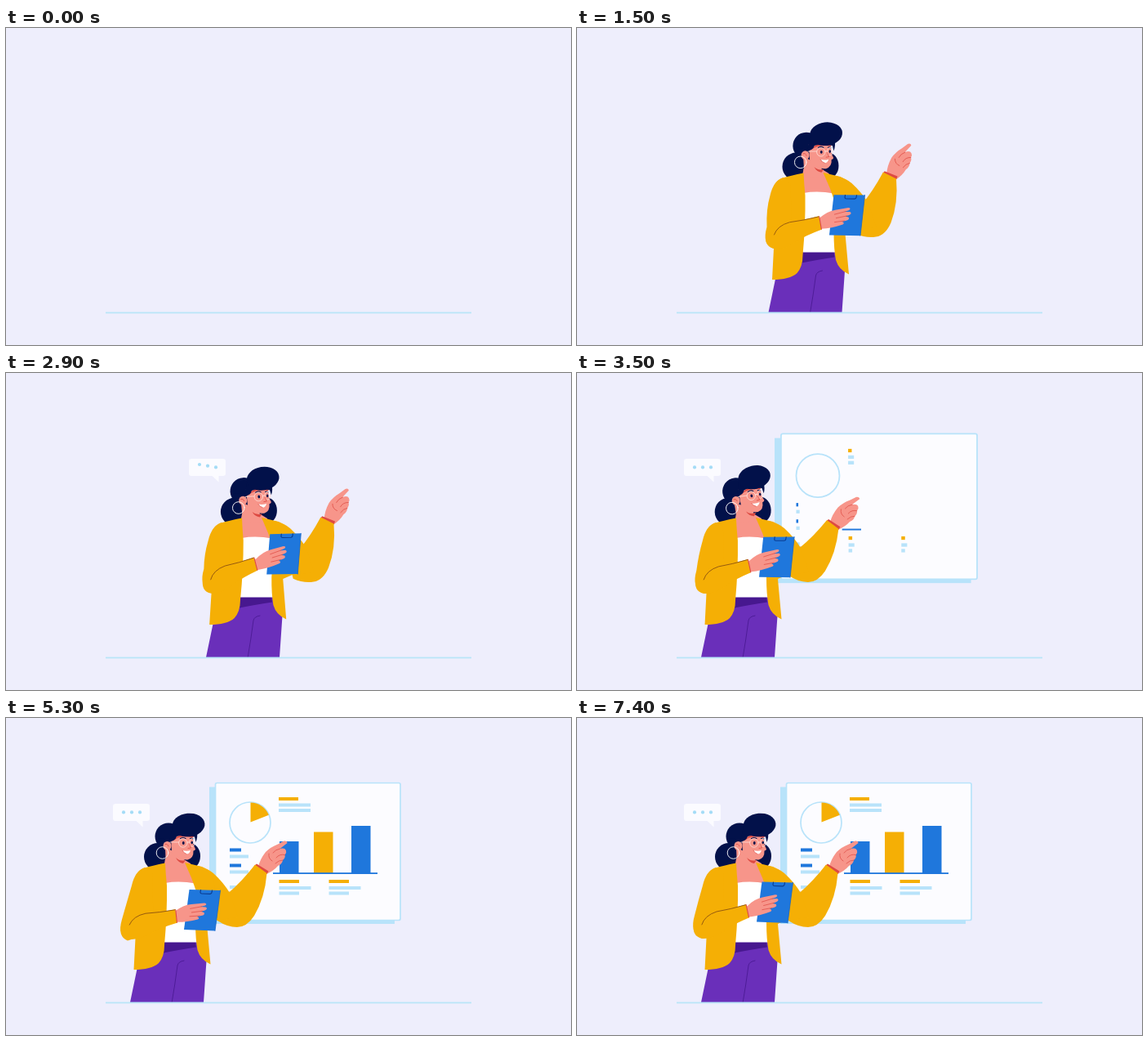
Recreate the animation shown at these times as an HTML page with a canvas. Size 692 px wide and 388 px high, loop 7.5 s.

```html
<!DOCTYPE html>
<html lang="en">
<head>
<meta charset="utf-8">
<title>Presentation</title>
<style>
  html, body { margin: 0; width: 100%; height: 100%; overflow: hidden; background: #eeeefc; }
  canvas { display: block; width: 692px; height: 388px; }
</style>
</head>
<body>
<canvas id="stage" width="692" height="388"></canvas>
<script>
const ctx = document.getElementById('stage').getContext('2d');
const LOOP = 7500, STEP = 100;
const C = {
  bg: '#eeeefc', pale: '#b8e3fa', paper: '#fcfcff', blue: '#1f77dc', deep: '#0b3d91',
  gold: '#f5af05', seam: '#8f5410', skin: '#f7958a', blush: '#dd4a42',
  navy: '#02114a', purple: '#6a2fba', plum: '#47188f', white: '#ffffff', lens: '#ffe0da'
};

// Eased value from [time, value] pairs
function key(t, list) {
  if (t <= list[0][0]) return list[0][1];
  for (let i = 1; i < list.length; i++) {
    const [a, x] = list[i - 1], [b, y] = list[i];
    if (t < b) {
      const u = (t - a) / (b - a);
      return x + (y - x) * u * u * (3 - 2 * u);
    }
  }
  return list[list.length - 1][1];
}
const easeOut = u => 1 - Math.pow(1 - Math.min(1, Math.max(0, u)), 3);

function fill(d, color) {
  ctx.fillStyle = color;
  ctx.fill(new Path2D(d));
}
function line(d, color, width = 1) {
  ctx.strokeStyle = color;
  ctx.lineWidth = width;
  ctx.stroke(new Path2D(d));
}
function rect(x, y, w, h, color) {
  ctx.fillStyle = color;
  ctx.fillRect(x, y, w, h);
}
function oval(x, y, rx, ry, color, turn = 0) {
  ctx.beginPath();
  ctx.ellipse(x, y, rx, ry, turn, 0, Math.PI * 2);
  ctx.fillStyle = color;
  ctx.fill();
}
function ring(x, y, rx, ry, color, width = 1) {
  ctx.beginPath();
  ctx.ellipse(x, y, rx, ry, 0, 0, Math.PI * 2);
  ctx.strokeStyle = color;
  ctx.lineWidth = width;
  ctx.stroke();
}
function group(draw, dx = 0, dy = 0, turn = 0, px = 0, py = 0, scale = 1) {
  ctx.save();
  ctx.translate(px + dx, py + dy);
  ctx.rotate(turn);
  ctx.scale(scale, scale);
  ctx.translate(-px, -py);
  draw();
  ctx.restore();
}
// Shears the upper body sideways, with the waist held still
function leaning(draw, lean) {
  const k = lean / 95;
  ctx.save();
  ctx.transform(1, 0, -k, 1, k * 275, 0);
  draw();
  ctx.restore();
}

const keys = {
  x: [[2400, 82.5], [2800, 93], [2900, 93], [3300, 0]],
  y: [[0, 245], [100, 215], [200, 120], [300, 55], [400, 22], [500, 6], [700, -10], [900, -4], [1300, 0]],
  lean: [[500, -6], [1000, 1], [1500, 0], [2900, 1], [4200, -1.5], [5000, 0]],
  head: [[500, -.28], [1000, .03], [1500, -.02], [2900, -.06], [3300, -.1], [3900, -.22], [4200, -.2], [5000, 0]],
  headY: [[500, -2.5], [1500, -1], [2900, -1], [4200, -2.5], [5000, 0]],
  point: [[500, -.19], [1000, -.13], [1500, -.17], [2900, -.17], [3500, .02], [3900, 0]],
  pointX: [[500, -6], [1000, -2], [2900, -2], [3600, 0]],
  elbow: [[500, -4], [1500, 7], [2900, 6], [4200, 0], [5300, -1], [7400, 1]],
  lift: [[500, 5], [1500, -1], [2900, -8.5], [4200, 0], [5300, 5], [6800, -8], [7200, -6.5], [7400, -4.5]],
  tilt: [[500, -.05], [1500, -.02], [2900, -.05], [4200, 0]],
  pop: [[1600, 0], [1900, 1.08], [2200, 1]],
  panel: [[3200, 0], [3500, 1.06], [3800, .993], [4200, 1]],
  rows: [[3400, 0], [3800, 1.1], [4200, 1.05], [5200, 1]],
  slice: [[3500, -1.57], [4200, -.5], [5000, -.373]]
};

function row(x, y, w, color, grow) {
  rect(x, y, w * grow, 4, color);
}

function board(t) {
  const grow = key(t, keys.rows);
  rect(249, 84.5, 227, 167.5, C.pale);
  ctx.beginPath();
  ctx.roundRect(256.5, 79.5, 226.5, 168, 2);
  ctx.fillStyle = C.paper;
  ctx.fill();
  ctx.strokeStyle = C.pale;
  ctx.lineWidth = 1.7;
  ctx.stroke();

  ring(299, 128, 25, 25, C.pale, 1.7);
  ctx.beginPath();
  ctx.moveTo(299.5, 127.5);
  ctx.arc(299.5, 127.5, 24, -Math.PI / 2, key(t, keys.slice));
  ctx.closePath();
  ctx.fillStyle = C.gold;
  ctx.fill();

  row(334, 97, 24, C.gold, grow);
  row(334, 104.5, 39, C.pale, grow);
  row(334, 111, 39, C.pale, grow);
  for (const y of [159.5, 178.5]) {
    row(274, y, 14, C.blue, grow);
    row(274, y + 8, 23, C.pale, grow);
  }
  row(274, 205, 23, C.pale, grow);
  for (const x of [334.5, 395.5]) {
    row(x, 198, 24.5, C.gold, grow);
    row(x, 206, 39, C.pale, grow);
    row(x, 212.5, 24.5, C.pale, grow);
  }

  const bars = [[335, 39, C.blue, 3500], [377, 50.5, C.gold, 3984], [423, 58, C.blue, 4127]];
  for (const [x, h, color, start] of bars) {
    const now = h * easeOut((t - start) / 800);
    rect(x, 190 - now, 23.5, now, color);
  }
  rect(327, 189.2, 128 * Math.min(grow, 1.01), 1.8, C.blue);
}

function bubble(t) {
  fill('M134 105H173Q176 105 176 108V123Q176 126 173 126H167.500V133.500L159.500 126H134Q131 126 131 123V108Q131 105 134 105Z', '#fbfbff');
  for (let i = 0; i < 3; i++) {
    const u = Math.min(1, Math.max(0, (t - 2600 - 150 * i) / 600));
    oval(144 + 10 * i, 115.4 - 3.4 * Math.sin(Math.PI * u) ** 2, 2.1, 2.1, '#a4dcf6');
  }
}

function backHair() {
  oval(186, 170, 17, 17, C.navy);
  oval(225, 169, 13, 16, C.navy);
  oval(206, 166, 22, 18, C.navy);
}

function head() {
  oval(199, 145, 16.5, 16.5, C.navy);
  fill('M186 147Q185 165 198 168L210 150Z', C.navy);
  fill('M195 158L196 184H217L217 170Z', C.skin);
  fill('M208 171Q213 176 220 174L217 178Q211 177 208 171Z', C.blush);
  fill('M202 143H227Q230 149 229.500 155L232 160.500Q231.500 162.500 229.500 162.500Q230 171.500 222.500 173.500Q212 174 203 165Z', C.skin);
  oval(197.500, 156.500, 5, 5.5, C.skin);
  line('M195 154.500Q198 153.500 199 157', C.blush, .8);
  fill('M205 150Q208 145 217 142L230 145L229 146.500Q219 143.500 211 146.500Q208 147.500 205 150Z', C.blush);
  fill('M200 151Q207 151 209 145Q218 141.500 231 145.500L232.500 152Q235 146 234 138L204 133Z', C.navy);
  oval(223.500, 131, 20, 14.3, C.navy, -.1);

  line('M213.500 147.500Q217 145.500 220 147.500M225.500 147.500Q227.500 146.500 229 148', C.navy, 1.1);
  oval(217.300, 153, 1.4, 1.9, C.navy);
  oval(227.800, 152.500, 1.2, 1.8, C.navy);
  ring(216.800, 153, 5.2, 5.2, C.lens, .8);
  ring(228, 152.500, 3.4, 4.8, C.lens, .8);
  line('M201 152L211.500 152M222 152L224.500 152', C.lens, .8);
  line('M224.500 154L226.500 159L223 159.500', C.blush, .8);
  fill('M216 162Q221 163.500 226 162Q224.500 166.500 221 166.500Q217.500 165.500 216 162Z', C.white);
  line('M216 162Q217.500 165.500 221 166.500', C.blush, .7);
  ring(191.500, 165, 7.3, 7.3, C.white, .9);
}

function pants() {
  fill('M194 274H236L246 290L242 348L241 366H148L152 348L162 300Z', C.purple);
  fill('M194 274.300H232L233 280.500Q210 284 193 287.500Z', C.plum);
  line('M218 297Q211 298 210 303Q207 326 203 349', C.plum, .8);
}

function chest() {
  fill('M194 196H234L235 274.500H194Z', C.white);
  fill('M195 172L193 184L195 202Q212 199 232 202.500L226 178L216 172Z', C.skin);
}

function jacket(ax, lift) {
  fill('M195 177.500Q179 180.500 168 184Q158 188 156 205L159 260L156.500 308Q178 308 187 300Q194 292 194 278Q197.500 240 197 205Q195.500 190 195 177.500Z', C.gold);
  fill('M219 177L240 182Q247 185 253 192L262 245L246 252L250.500 301.500Q238 296 234.500 284Q232 270 232 250L234 215Q228 196 219 177Z', C.gold);
  const e = lift * .5;
  fill(`M170 183Q158 187 154 205Q149 222 ${143 + ax} ${244 + e}Q${137 + ax} ${265 + e} ${150 + ax} ${270 + e}L181 262L179 190Z`, C.gold);
}

function pointer() {
  fill('M309 182Q311 173 318 164Q324 158 333 154.500L340.500 150.500Q344.500 150 344.500 153L335.500 160Q342 158.500 343 162.500Q344 165 341.500 167.500Q342.500 171 339 174Q338.500 178.500 333 181Q328 187 319 191Z', C.skin);
  line('M335.500 160Q330 161 327 165M341.500 167.500Q335 166 331 171M339 174Q334 174 330 178M322 166Q321 172 326 175', C.blush, .7);
  fill('M307 178.500L321.500 187.500L319.500 191L304 181Z', C.blush);
  fill('M272.500 214Q289 200 305 179.500L319.500 190Q317 220 304 242Q295 256 283 256Q271 256 259 248L257 220Z', C.gold);
  line('M273 213Q270 217 266 219', C.seam, .8);
}

function forearm() {
  fill('M143 250Q149 240 170 237Q188 236 207 231L210 247.500Q192 254 180 261Q165 272 151 270Q138 266 143 250Z', C.gold);
  line('M152 253Q156 242 171 238Q188 236 207 231.500', C.seam, .9);
  line('M207.500 231.500L210 247', C.blush, 1.1);
}

function clipboard() {
  fill('M225.500 205L263.500 206L257 255.500L219 254Z', C.blue);
  line('M239.500 205.500L239 208.500Q239 210 241 210L251 210.300Q253 210 253 208.500L253.500 206', C.deep, 1.2);
  line('M263.500 206L257 255.500', '#1966c4', .8);
}

function hand() {
  fill('M200 234L208 233Q217 225 227 223.500L243 221Q247 221.500 244 224L238 226L245 226Q248 228 244 230L239 231.500L243 232.500Q245 235 241 236.500L235 238Q239 239.500 236 241.500Q222 246 210 246.500L200 247Z', C.skin);
  line('M240 225.500L226 229M241 231L228 233.500M238 237L226 238.500', C.blush, .7);
}

function woman(t) {
  const lean = key(t, keys.lean), turn = key(t, keys.head), hy = key(t, keys.headY);
  const ax = key(t, keys.elbow), lift = key(t, keys.lift), wrist = lift * .65;
  group(backHair, lean, hy * .5, turn * .2, 208, 178);
  pants();
  leaning(chest, lean);
  group(pointer, key(t, keys.pointX), 0, key(t, keys.point), 282, 240);
  leaning(() => {
    fill('M235 181Q247 184 254 190Q266 201 274 214L284 244L258 248Z', C.gold);
    jacket(ax, lift);
  }, lean);
  group(head, lean, hy, turn, 208, 178);
  group(clipboard, ax, lift, key(t, keys.tilt), 240, 230);
  group(hand, ax, wrist, (lift - wrist) / 28, 209, 240);
  group(forearm, ax, 0, wrist / 58, 150, 256);
}

function draw(t) {
  rect(0, 0, 692, 388, C.bg);
  const size = key(t, keys.panel), pop = key(t, keys.pop), x = key(t, keys.x);
  if (size > 0) group(() => board(t), 0, 0, 0, 366, 166, size);
  if (pop > 0) group(() => bubble(t), x, 0, 0, 160, 122, pop);
  if (t > 0) {
    ctx.save();
    ctx.beginPath();
    ctx.rect(0, 0, 692, 348);
    ctx.clip();
    group(() => woman(t), x, key(t, keys.y));
    ctx.restore();
  }
  rect(122, 347.6, 448, 1.8, '#b9e5f7');
}

ctx.lineCap = ctx.lineJoin = 'round';
const began = performance.now();
function tick() {
  const t = (performance.now() - began) % LOOP;
  draw(Math.floor(t / STEP) * STEP);
  requestAnimationFrame(tick);
}
tick();
</script>
</body>
</html>
```
